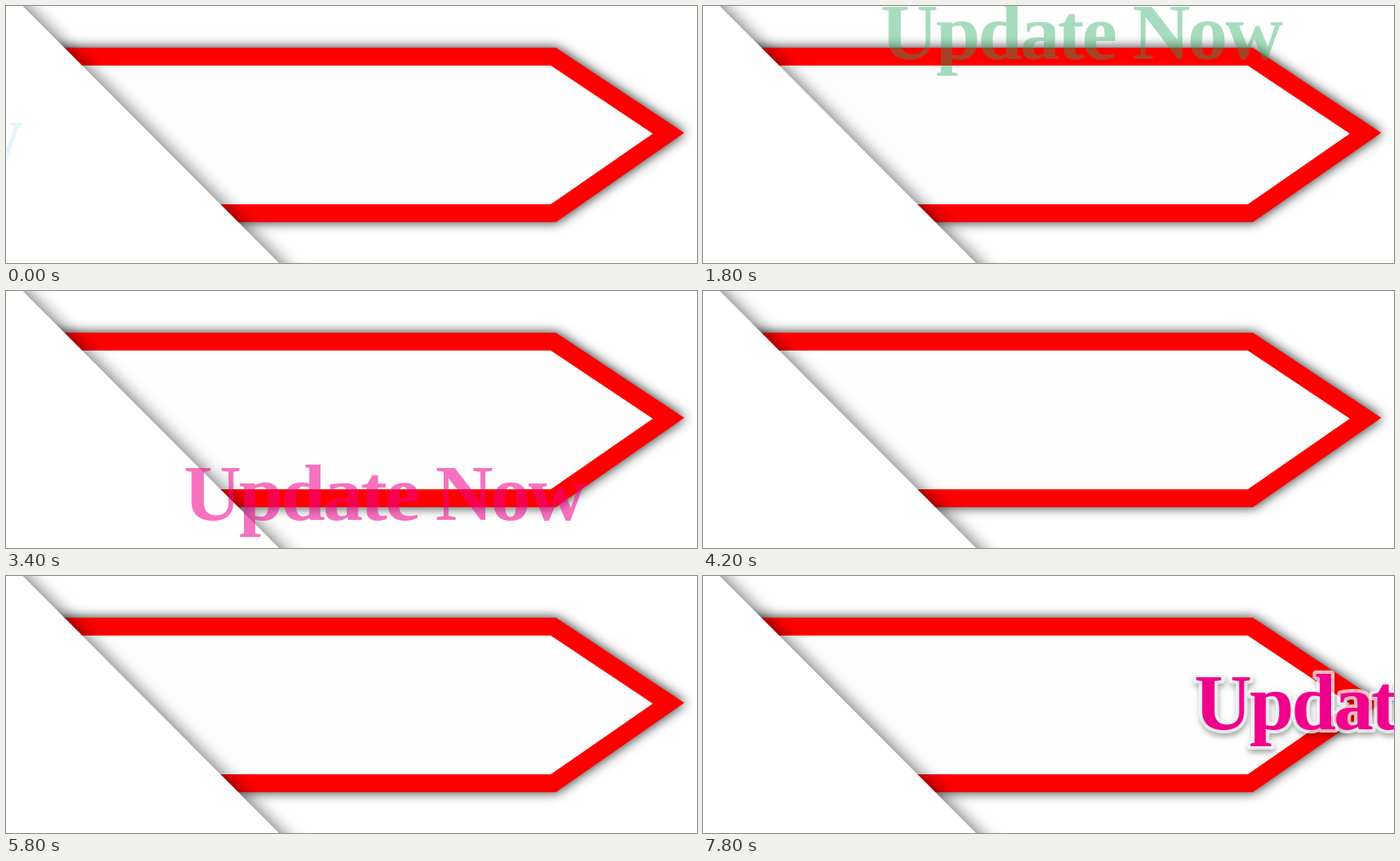
An HTML page that plays this animation: 813x302 px, repeating every 8 s.

```html
<!DOCTYPE html>
<html lang="en">
<head>
<meta charset="utf-8">
<title>Update Now</title>
<style>
  html, body { margin: 0; width: 100%; height: 100%; overflow: hidden; background: #fff; }
  svg { display: block; width: 813px; height: 302px; }
  .arrow { filter: drop-shadow(1px 0 7px rgba(0, 0, 0, .85)); }
  .sheet { filter: drop-shadow(2px 0 10px rgba(0, 0, 0, .6)); }
  text {
    font: bold 94px "Liberation Serif", "Times New Roman", serif;
    letter-spacing: -.03em;
  }
  .outlined {
    stroke: rgba(255, 255, 255, .72);
    stroke-width: 8px;
    stroke-linejoin: round;
    paint-order: stroke;
    filter: drop-shadow(1px 4px 3px rgba(0, 0, 0, .4));
  }
</style>
</head>
<body>
<svg viewBox="0 0 813 302">
  <g class="arrow">
    <path fill="#f00" d="M20 49H647L798 149L647 254H20Z"/>
    <path fill="#fefefe" d="M20 70H641L761 150L641 233H20Z"/>
  </g>
  <path class="sheet" fill="#fff" d="M-80 -100L421 402H-80Z"/>
  <text id="label">Update Now</text>
</svg>
<script>
  const STEP = 200, STEPS = 40, ENTRY = 7;
  const BASELINE = 180, REST_X = 209;
  const BLINK_START = 3 * ENTRY, EXIT_START = 36;
  const PINK = '#f0008c';

  // Each entrance runs from the offset (dx, dy) to its resting place.
  const entrances = [
    { color: '#00aeef', x: 222, dx: -676, dy: 0 },
    { color: '#24a95b', x: REST_X, dx: 0, dy: -177 },
    { color: PINK, x: REST_X, dx: 0, dy: 177 }
  ];
  const label = document.getElementById('label');

  function pose(step) {
    if (step < BLINK_START) {
      const { color, x, dx, dy } = entrances[Math.floor(step / ENTRY)];
      const progress = (step % ENTRY) / (ENTRY - 1);
      return {
        color,
        x: x + dx * (1 - progress),
        y: BASELINE + dy * (1 - progress),
        opacity: .1 + .9 * progress
      };
    }
    const exitSteps = Math.max(0, step - EXIT_START);
    const visible = exitSteps > 0 || (step - BLINK_START) % 2 === 1;
    return {
      color: PINK,
      x: REST_X + 123 * exitSteps,
      y: BASELINE,
      opacity: visible ? 1 : 0,
      outlined: exitSteps > 0
    };
  }

  function draw(now) {
    const { color, x, y, opacity, outlined = false } = pose(Math.floor(now / STEP) % STEPS);
    label.setAttribute('x', x);
    label.setAttribute('y', y);
    label.setAttribute('fill', color);
    label.setAttribute('opacity', opacity);
    label.classList.toggle('outlined', outlined);
  }

  const start = performance.now();
  function tick() {
    draw(performance.now() - start);
    requestAnimationFrame(tick);
  }
  tick();
</script>
</body>
</html>
```
